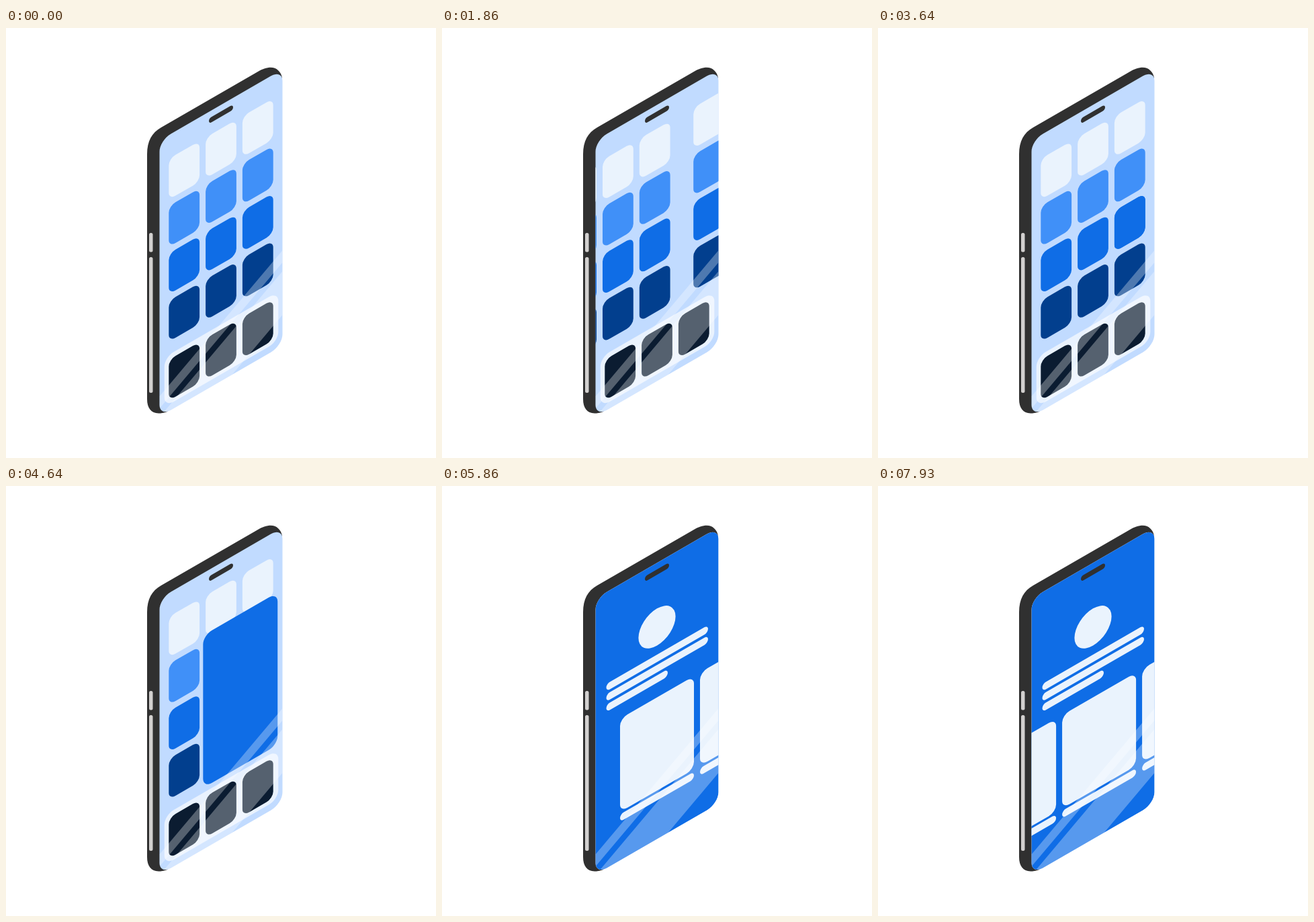
Write an HTML page with a canvas that moves like this. It is 640 px wide and 640 px high and loops after 8 s.

```html
<!DOCTYPE html>
<html lang="en">
<head>
<meta charset="utf-8">
<title>Phone</title>
<style>
  html, body { margin: 0; width: 100%; height: 100%; overflow: hidden; background: #fff; }
  canvas { display: block; width: 640px; height: 640px; }
</style>
</head>
<body>
<canvas id="stage" width="640" height="640"></canvas>
<script>
const ctx = document.getElementById('stage').getContext('2d');
const LOOP = 8000, TICKS = 112;
const SKEW = Math.tan(Math.PI / 6), LEFT = 228.5;
const PALE = '#eaf3fd', BLUE = '#0f6de6', DARK = '#303030';
const ROWS = [PALE, '#4090f8', BLUE, '#023f8e'];
const SCREEN = { x: 0, y: 167.2, w: 183, h: 411.1, r: 17 };
const ICON = { x: 13.8, y: 202.6, w: 45.8, h: 60.7, r: 10 };
const COL = 54.8, ROW = 70.45, PAGE = 190, CARD_STEP = 119;

const clamp = v => Math.min(1, Math.max(0, v));
const mix = (a, b, p) => a + (b - a) * p;

// Cubic Bezier easing with handles (x1, 0) and (x2, 1)
function ease(t, x1, x2) {
  if (t <= 0) return 0;
  if (t >= 1) return 1;
  let lo = 0, hi = 1;
  for (let i = 0; i < 24; i++) {
    const s = (lo + hi) / 2, q = 1 - s;
    if (3 * x1 * s * q * q + 3 * x2 * s * s * q + s * s * s < t) lo = s; else hi = s;
  }
  return lo * lo * (3 - 2 * lo);
}

const flat = () => ctx.setTransform(1, 0, 0, 1, 0, 0);
const onScreen = () => ctx.setTransform(1, -SKEW, 0, 1, LEFT, 0);

function rect(x, y, w, h, r, color) {
  ctx.fillStyle = color;
  ctx.beginPath();
  ctx.roundRect(x, y, w, h, r);
  ctx.fill();
}

// Fully rounded bar centred on height y
const bar = (x, y, w, h, color) => rect(x, y - h / 2, w, h, h / 2, color);

function icon(col, top, color, shift = 0) {
  rect(ICON.x + col * COL + shift, top, ICON.w, ICON.h, ICON.r, color);
}

function drawBody() {
  flat();
  ctx.fillStyle = DARK;
  ctx.fill(new Path2D('M210 552V188C210 168 217 156 231 148L374 65.4' +
    'C386 58.5 398 56 405 63C409 67 411 71 411 77L400 300L240 571' +
    'C234 573 231 573.5 227 573.5C216 573 210 566 210 552Z'));
  rect(213, 305, 5.5, 28.5, 2.5, '#d2d0cf');
  rect(213, 341, 5.5, 202, 2.5, '#d2d0cf');
}

function drawHome(tick) {
  const slide = PAGE * ease((tick - 16) / 18, .75, .25);
  for (const page of [-1, 0]) {
    ROWS.forEach((color, row) => {
      for (let col = 0; col < 3; col++) icon(col, ICON.y + row * ROW, color, slide + page * PAGE);
    });
  }
  rect(7.3, 494.3, 169.5, 74, 14, '#e9f2fe');
  for (let col = 0; col < 3; col++) icon(col, 501.7, '#0b1c31');
}

function drawPanel(tick) {
  const p = ease((tick - 49.8) / 26.2, .8, .33);
  if (p <= 0) return;
  const from = { ...ICON, x: ICON.x + 2 * COL, y: ICON.y + 2 * ROW };
  const [x, y, w, h, r] = ['x', 'y', 'w', 'h', 'r'].map(k => mix(from[k], SCREEN[k], p));
  rect(x, y, w, h, r, BLUE);
}

// Each item fades in and rises, a little after the one before it
function reveal(tick, order, draw) {
  const p = clamp((tick - 68 - order * 1.15) / 8);
  if (p <= 0) return;
  ctx.save();
  ctx.globalAlpha = p;
  ctx.translate(0, 35 * (1 - p) ** 2);
  draw();
  ctx.restore();
}

function drawContent(tick) {
  reveal(tick, 0, () => {
    ctx.fillStyle = PALE;
    ctx.beginPath();
    ctx.arc(91.5, 262.8, 27.6, 0, 2 * Math.PI);
    ctx.fill();
  });
  [151.5, 151.5, 91.5].forEach((width, i) =>
    reveal(tick, 1 + i, () => bar(16, 309.3 + i * 15.4, width, 11, PALE)));

  const slide = CARD_STEP * ease((tick - 99.57) / 16, .75, .25);
  for (let i = 0; i < 3; i++) {
    reveal(tick, i ? 5 : 4, () => {
      const x = 36.5 + i * CARD_STEP - slide;
      rect(x, 367.4, 110, 138.8, 11, PALE);
      bar(x, 515.3, 110, 11, PALE);
    });
  }
}

function drawGlare() {
  const drop = 1.187 * 183;
  flat();
  ctx.fillStyle = 'rgba(255,255,255,.3)';
  for (const [top, bottom] of [[331, 349], [362, 427]]) {
    ctx.beginPath();
    ctx.moveTo(411.5, top);
    ctx.lineTo(411.5, bottom);
    ctx.lineTo(LEFT, bottom + drop);
    ctx.lineTo(LEFT, top + drop);
    ctx.fill();
  }
}

function render(tick) {
  flat();
  ctx.fillStyle = '#fff';
  ctx.fillRect(0, 0, 640, 640);
  drawBody();

  ctx.save();
  onScreen();
  rect(SCREEN.x, SCREEN.y, SCREEN.w, SCREEN.h, SCREEN.r, '#c1dbff');
  ctx.clip();
  drawHome(tick);
  drawPanel(tick);
  drawContent(tick);
  bar(73.5, 181, 36, 8, DARK);
  drawGlare();
  ctx.restore();
}

const start = performance.now();
function loop() {
  const time = (performance.now() - start) % LOOP;
  render(Math.floor(time / LOOP * TICKS));
  requestAnimationFrame(loop);
}
loop();
</script>
</body>
</html>
```
